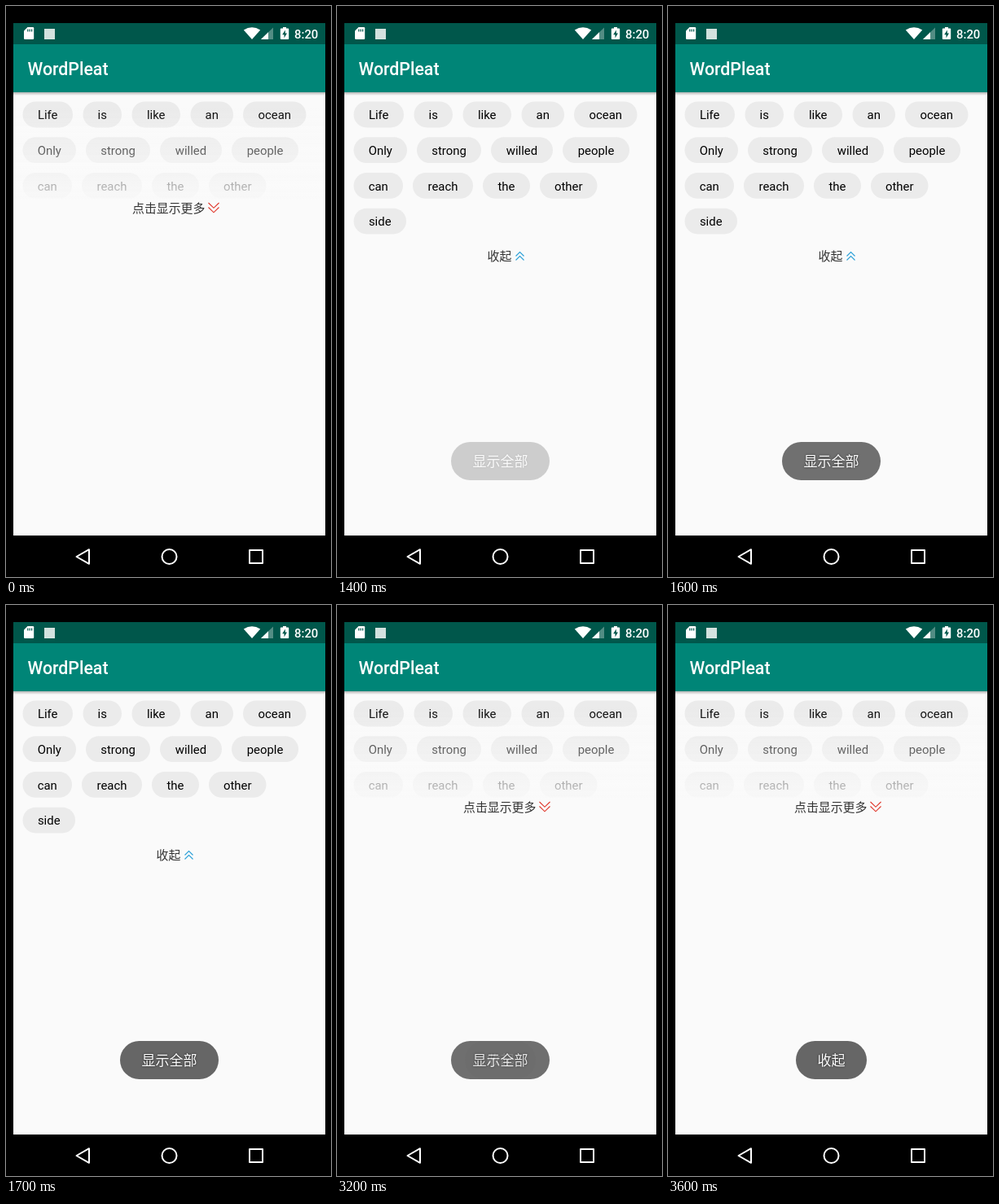
An HTML page that plays this animation: 399x702 px, repeating every 4600 ms.

```html
<!DOCTYPE html>
<html lang="zh-CN">
<head>
<meta charset="utf-8">
<title>Collapsible tags</title>
<style>
  html, body { margin: 0; width: 100%; height: 100%; overflow: hidden; background: #000; }
  svg { display: block; width: 399px; height: 702px; }
  text { font-family: Roboto, "Noto Sans CJK SC", "Noto Sans CJK", sans-serif; }
  .medium { font-weight: 500; fill: #fff; }
  .chip rect { fill: #ebebeb; }
  .chip text { font-size: 14.9px; text-anchor: middle; }
  .more { font-size: 14.9px; fill: #333; }
  .line { fill: none; stroke-width: 1.1; }
  .nav { fill: none; stroke: #fff; stroke-width: 2; stroke-linejoin: round; }
  .toast rect { fill: #666; }
  .toast text { font-size: 17px; fill: #fff; text-anchor: middle; text-shadow: 0 0 2.5px rgba(0, 0, 0, .7); }
</style>
</head>
<body>
<svg viewBox="0 0 399 702">
  <defs>
    <linearGradient id="fade" gradientUnits="userSpaceOnUse" x1="0" y1="125" x2="0" y2="260">
      <stop stop-color="#fafafa" stop-opacity="0"/>
      <stop offset="1" stop-color="#fafafa"/>
    </linearGradient>
    <linearGradient id="shade" x2="0" y2="1">
      <stop stop-opacity=".28"/>
      <stop offset="1" stop-opacity="0"/>
    </linearGradient>
  </defs>

  <rect width="399" height="702"/>
  <rect x="9" y="21" width="383" height="630" fill="#fafafa"/>
  <rect x="9" y="21" width="383" height="26" fill="#00574b"/>
  <rect x="9" y="47" width="383" height="59" fill="#008577"/>
  <rect x="9" y="106" width="383" height="4" fill="url(#shade)"/>

  <!-- Status bar -->
  <g fill="#fff">
    <path d="M26.5 26H33a1.2 1.2 0 0 1 1.2 1.2V39.800a1.200 1.200 0 0 1-1.200 1.200H23.200a1.200 1.200 0 0 1-1.200-1.200V30.500Z"/>
    <path d="M26.800 28.500v3M29.200 28.500v3M31.600 28.500v3" stroke="#00574b" stroke-width="1.200"/>
    <rect x="47" y="28" width="13" height="13" fill="#d3e2df"/>
    <path d="M302 41 291.800 29.500Q302 23 312.200 29.500Z"/>
    <path d="M313 41H328V26.500Z" opacity=".32"/>
    <path d="M313 41H322V32.300Z"/>
    <path d="M340 26h4v1.500h2.200a1 1 0 0 1 1 1V40a1 1 0 0 1-1 1h-8.400a1 1 0 0 1-1-1V28.500a1 1 0 0 1 1-1H340Z"/>
    <path d="M342.800 29.500 339.200 35.300H341.500V39.300L345 33.500H342.800Z" fill="#00574b"/>
  </g>
  <text class="medium" x="354" y="39.500" font-size="14.900">8:20</text>
  <text class="medium" x="26.500" y="84.700" font-size="21.300">WordPleat</text>

  <g id="chips"></g>

  <g id="collapsed">
    <rect x="9" y="112" width="383" height="126" fill="url(#fade)"/>
    <text class="more" x="155" y="253.500">点击显示更多</text>
    <path class="line" stroke="#e0382c" d="M248.500 242 255 248.300 261.500 242M248.500 247.500 255 253.800 261.500 247.500"/>
  </g>
  <g id="expanded">
    <text class="more" x="184.500" y="313">收起</text>
    <path class="line" stroke="#2a9fd8" d="M219.500 307.500 224.500 302.500 229.500 307.500M219.500 312.500 224.500 307.500 229.500 312.500"/>
  </g>

  <g id="shown" class="toast">
    <rect x="140" y="536" width="121" height="47" rx="23.500"/>
    <text x="200.500" y="566">显示全部</text>
  </g>
  <g id="folded" class="toast">
    <rect x="157" y="536" width="87" height="47" rx="23.500"/>
    <text x="200.500" y="566">收起</text>
  </g>

  <g class="nav">
    <path d="M86.500 677 102 668.200V685.800Z"/>
    <circle cx="200.500" cy="677" r="9"/>
    <rect x="299" y="669" width="16" height="16"/>
  </g>
</svg>
<script>
  const LOOP = 4600;
  const OPEN = 1300;
  const CLOSE = 2900;
  const $ = selector => document.querySelector(selector);

  function add(parent, tag, attrs) {
    const node = document.createElementNS(parent.namespaceURI, tag);
    for (const name in attrs) node.setAttribute(name, attrs[name]);
    return parent.appendChild(node);
  }

  // Each chip: word, left, right.
  const rows = [
    [['Life', 20.5, 82], ['is', 94.5, 142], ['like', 154.5, 214], ['an', 226.5, 279], ['ocean', 291, 368.5]],
    [['Only', 20.5, 86], ['strong', 98, 177], ['willed', 189, 265], ['people', 277, 359]],
    [['can', 20.5, 81], ['reach', 93, 167], ['the', 179, 237], ['other', 249, 319.5]],
    [['side', 20.5, 85]]
  ];
  rows.forEach((row, i) => {
    const group = add($('#chips'), 'g', { class: 'chip', id: 'row' + i });
    const top = 117.6 + i * 43.7;
    for (const [word, left, right] of row) {
      add(group, 'rect', { x: left, y: top, width: right - left, height: 31.8, rx: 15.9 });
      add(group, 'text', { x: (left + right) / 2, y: top + 21.5 }).textContent = word;
    }
  });

  // Plays a table of [ms, value] holds, with a hard change at each time.
  function play(selector, property, holds) {
    const frames = holds.map(([ms, value]) => ({ offset: ms / LOOP, [property]: value, easing: 'steps(1, end)' }));
    frames.push({ ...frames[frames.length - 1], offset: 1 });
    return $(selector).animate(frames, { duration: LOOP, iterations: Infinity });
  }

  const openOnly = [[0, 0], [OPEN, 1], [CLOSE, 0]];
  const players = [
    play('#collapsed', 'opacity', [[0, 1], [OPEN, 0], [CLOSE, 1]]),
    play('#expanded', 'opacity', openOnly),
    play('#row3', 'opacity', openOnly),
    play('#shown', 'opacity', [
      [0, 0], [1400, .3], [1500, .7], [1600, .93], [1700, 1],
      [3200, .94], [3300, .75], [3400, .45], [3500, .15], [3600, 0]
    ]),
    play('#shown text', 'fill', [[0, '#fff'], [3400, '#333']]),
    play('#folded', 'opacity', [[0, 0], [3200, .15], [3300, .6], [3400, .95], [3500, 1]])
  ];
  const start = document.timeline.currentTime || 0;
  players.forEach(player => player.startTime = start);
</script>
</body>
</html>
```
